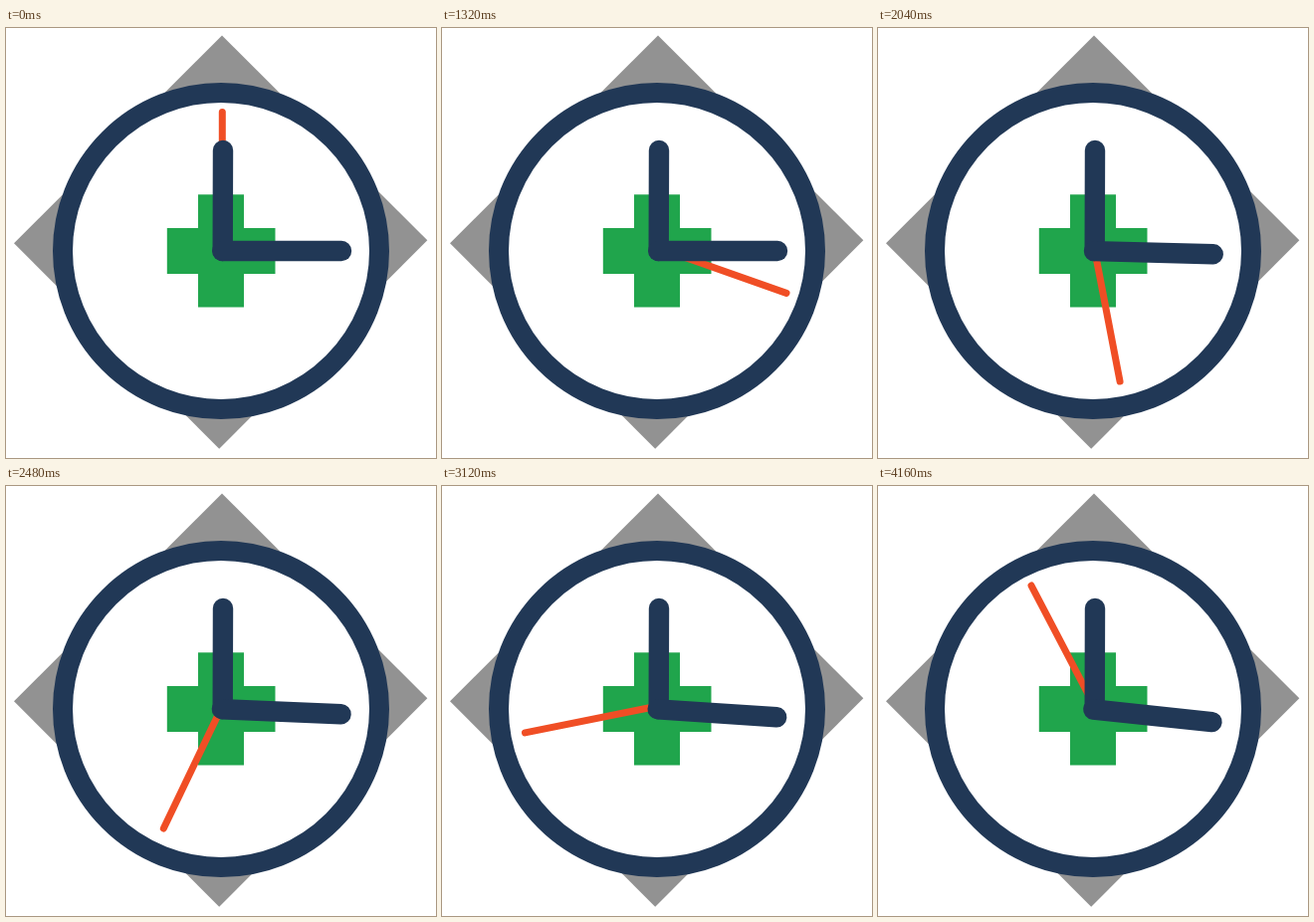
An HTML page with a canvas that plays this animation: 432x432 px, repeating every 4.2 s.

```html
<!DOCTYPE html>
<html lang="en">
<head>
<meta charset="utf-8">
<title>Clock</title>
<style>
html, body { margin: 0; width: 100%; height: 100%; overflow: hidden; background: #fff; }
canvas { display: block; width: 432px; height: 432px; }
</style>
</head>
<body>
<canvas id="stage" width="432" height="432"></canvas>
<script>
const ctx = document.getElementById('stage').getContext('2d');
const NAVY = '#213856', GREY = '#929292', GREEN = '#20a54c', RED = '#f04e25';
const LOOP = 4200, STEP = 40;
const rad = deg => deg * Math.PI / 180;

function line(x1, y1, x2, y2, width, color) {
  ctx.lineCap = 'round';
  ctx.lineWidth = width;
  ctx.strokeStyle = color;
  ctx.beginPath();
  ctx.moveTo(x1, y1);
  ctx.lineTo(x2, y2);
  ctx.stroke();
}

function rotated(x, y, deg, paint) {
  ctx.save();
  ctx.translate(x, y);
  ctx.rotate(rad(deg));
  paint();
  ctx.restore();
}

function drawFace() {
  ctx.fillStyle = '#fff';
  ctx.fillRect(0, 0, 432, 432);

  ctx.fillStyle = GREY;
  ctx.beginPath();
  ctx.moveTo(217, 7.5);
  ctx.lineTo(423.3, 213.3);
  ctx.lineTo(214.2, 422.7);
  ctx.lineTo(8, 216.3);
  ctx.fill();

  ctx.fillStyle = '#fff';
  ctx.strokeStyle = NAVY;
  ctx.lineWidth = 20;
  ctx.beginPath();
  ctx.arc(216, 224, 159, 0, Math.PI * 2);
  ctx.fill();
  ctx.stroke();

  ctx.fillStyle = GREEN;
  ctx.fillRect(193, 167.3, 46, 113.2);
  ctx.fillRect(161.8, 201, 108.7, 46);
}

function draw(t) {
  // The second hand stops just before the loop ends; the minute hand starts late.
  const second = Math.min(t * 0.0829, 332.4);
  const minute = Math.max(0, t - 1350) * 6 / 2810;

  drawFace();
  rotated(217.3, 221, second, () => line(0, 0, 0, -136.5, 7, RED));
  line(218, 123, 217.7, 224, 20.4, NAVY);
  rotated(212, 216, minute, () => line(5.2, 8, 125, 8, 20.4, NAVY));
}

const start = performance.now();
function tick() {
  const t = (performance.now() - start) % LOOP;
  draw(Math.floor(t / STEP) * STEP);
  requestAnimationFrame(tick);
}
tick();
</script>
</body>
</html>
```
